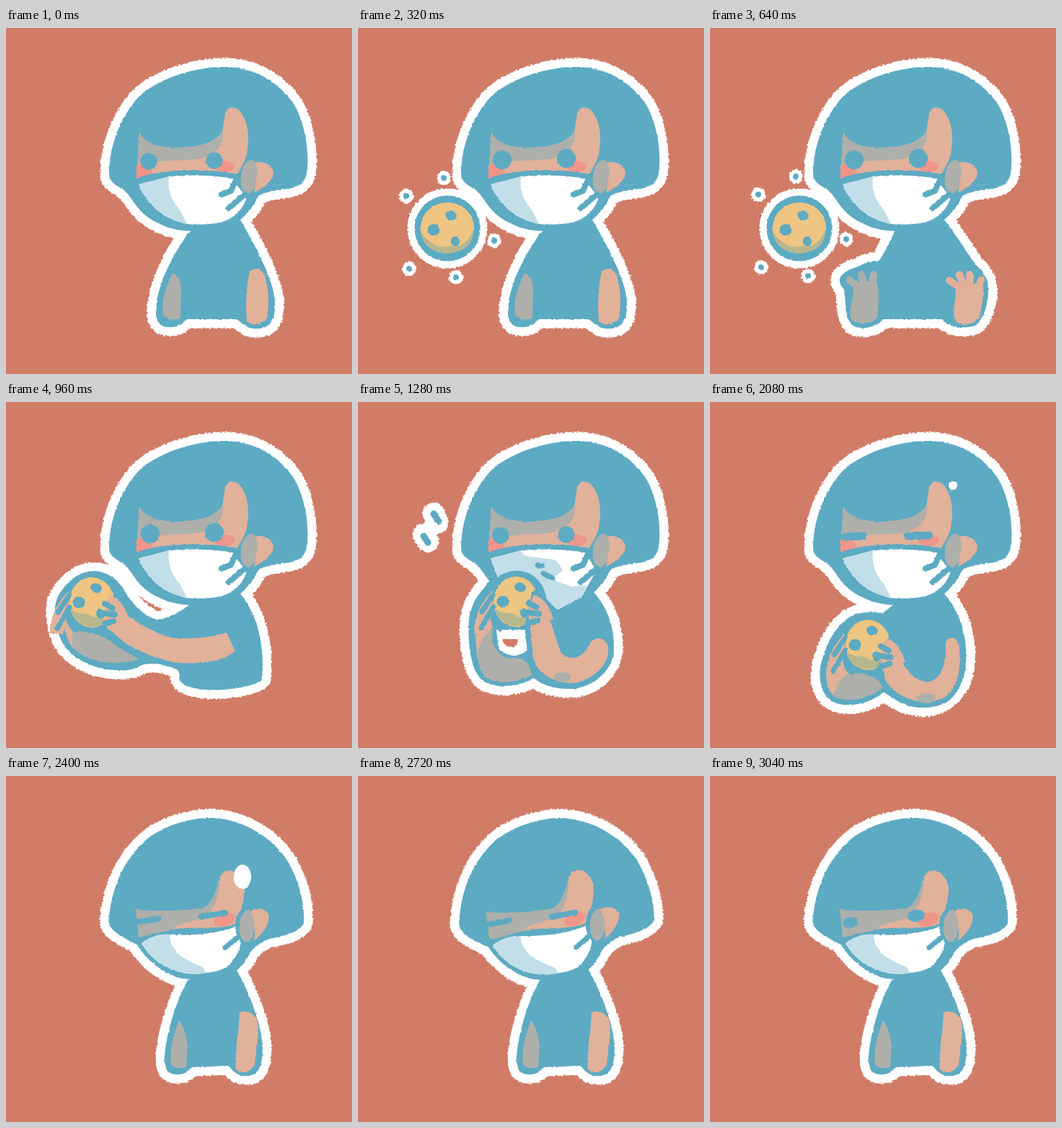
Recreate the animation shown at these times as an HTML page. Size 480 by 480 pixels, loop 3200 ms.

```html
<!DOCTYPE html>
<html lang="en">
<head>
<meta charset="utf-8">
<title>Snack under the mask</title>
<style>
  html, body { margin: 0; width: 100%; height: 100%; overflow: hidden; background: #d17c67; }
  svg { display: block; width: 100vw; height: 100vh; }
  .halo { fill: #fff; stroke: #fff; stroke-width: 25; stroke-linejoin: round; filter: url(#jagged); }
  .art { filter: url(#chalk); }
  .line { fill: none; stroke-linecap: round; stroke-linejoin: round; }
</style>
</head>
<body>
<svg viewBox="0 0 480 480">
  <defs>
    <filter id="jagged" filterUnits="userSpaceOnUse" x="0" y="0" width="480" height="480" color-interpolation-filters="sRGB">
      <feTurbulence type="fractalNoise" baseFrequency=".33" seed="4"/>
      <feDisplacementMap in="SourceGraphic" scale="5" xChannelSelector="R" yChannelSelector="G"/>
    </filter>
    <filter id="chalk" filterUnits="userSpaceOnUse" x="0" y="0" width="480" height="480" color-interpolation-filters="sRGB">
      <feTurbulence type="fractalNoise" baseFrequency=".28" seed="9"/>
      <feDisplacementMap in="SourceGraphic" scale="3" xChannelSelector="R" yChannelSelector="G"/>
    </filter>
  </defs>
  <g id="stage"></g>
</svg>
<script>
const BLUE = '#5daac3', SKIN = '#e1b19a', GREY = '#aeafaa', BLUSH = '#f0958a',
      PALE = '#c1dee9', WHITE = '#fff', GOLD = '#eec582', OLIVE = '#b6b78d', RED = '#d17c67';
const FRAME_MS = 160;

const fill = (d, color) => `<path d="${d}" fill="${color}"/>`;
const line = (d, color, width) => `<path class="line" d="${d}" stroke="${color}" stroke-width="${width}"/>`;
const outlined = (d, color) => line(d, BLUE, 15) + fill(d, color);
const oval = (x, y, rx, ry, color, turn = 0) =>
  `<ellipse cx="${x}" cy="${y}" rx="${rx}" ry="${ry}" fill="${color}" transform="rotate(${turn} ${x} ${y})"/>`;
const move = (x, y, art, scale = 1) => `<g transform="translate(${x} ${y}) scale(${scale})">${art}</g>`;
const wrap = (transform, art) => transform ? `<g transform="${transform}">${art}</g>` : art;

const maskShut =
  fill('M184 217L226 206C260 203 290 204 316 209C320 222 333 230 333 238C328 252 315 266 296 270C280 273 265 273 252 272C220 266 196 246 184 217Z', WHITE) +
  fill('M184 217L226 206C224 222 228 235 236 246C244 255 246 264 252 272C220 266 196 246 184 217Z', PALE);
const maskOpen =
  fill('M184 217L226 206C260 203 290 204 316 209C322 222 332 230 326 242L310 271L277 288L250 262L195 246Z', WHITE) +
  fill('M184 217L226 206L230 213L274 219L284 233L270 246L296 256L318 254L310 271L277 288L250 262L195 246Z', PALE) +
  line('M249 227H256M257 238L270 244', BLUE, 7);

const front = {
  shape: 'M143 200C144 165 156 130 180 100C205 72 258 54 303 54C346 54 381 76 402 110C417 140 421 178 417 202C414 217 403 222 384 224C370 226 358 228 350 233C345 245 335 258 325 266C300 282 265 285 234 279C202 271 186 256 174 237C168 228 162 223 154 219C145 213 143 208 143 200Z',
  face: mask =>
    fill('M185 145C192 160 215 167 240 166C270 165 295 158 301 140C303 125 304 110 313 110C328 110 337 135 336 155C336 177 329 192 320 203L250 198L181 208Z', SKIN) +
    fill('M185 145C192 160 215 167 240 166C270 165 295 158 301 140C303 165 290 178 265 182C235 184 205 185 182 189Z', GREY) +
    fill('M181 190C195 187 204 194 203 203L181 208Z', BLUSH) + oval(303, 192, 14, 8, BLUSH) +
    mask + line('M181 212C215 199 280 197 324 207', BLUE, 7) +
    line('M299 231L312 226L319 211M309 250L324 237L334 229', BLUE, 8) +
    oval(338, 206, 12, 23, GREY, 8) +
    fill('M347 186C360 184 372 192 371 203C368 214 358 222 344 228C348 212 350 200 347 186Z', SKIN),
  eyes: {
    open: oval(198, 185, 11.5, 11.5, BLUE) + oval(289, 184, 11.5, 11.5, BLUE),
    wide: oval(200, 183, 13, 13, BLUE) + oval(289, 181, 13, 13, BLUE),
    shut: line('M187 187L212 186M274 186L304 185', BLUE, 11)
  }
};

const tilted = {
  shape: 'M143 195C148 150 165 115 195 88C220 68 255 58 285 58C330 60 370 85 392 120C408 150 415 180 413 205C405 218 385 222 365 226C350 232 340 240 335 252C328 262 322 270 315 272C290 282 262 284 240 280C215 272 195 255 182 234C170 228 158 222 150 215C142 208 142 200 143 195Z',
  face: () =>
    fill('M180 184C205 190 245 186 270 184C290 178 292 150 300 135C310 125 328 135 331 155C330 175 326 190 318 205C300 214 260 208 232 213L184 224Z', GREY) +
    fill('M232 212C240 203 260 202 275 196C293 184 296 160 297 140C308 123 328 133 331 155C330 175 326 190 318 205C300 214 260 208 232 212Z', SKIN) +
    oval(303, 199, 15, 9, BLUSH, -20) +
    fill('M188 232C200 222 215 219 227 220C260 222 300 218 320 208C332 225 325 245 310 262C300 270 288 272 278 273C240 280 205 262 188 232Z', WHITE) +
    fill('M188 232C200 222 215 219 227 220C228 245 250 255 265 262C272 264 276 268 278 273C240 280 205 262 188 232Z', PALE) +
    line('M304 238L320 225', BLUE, 7) + oval(335, 208, 17, 26, BLUE) + oval(335, 208, 11, 22, GREY, 6) +
    fill('M339 187C350 181 363 184 365 195C364 208 355 220 344 228C347 213 345 200 339 187Z', SKIN),
  eyes: {
    open: oval(195, 203, 11, 7.5, BLUE, -10) + oval(286, 194, 12, 8.5, BLUE, -8),
    shut: line('M184 202L212 198M271 195L304 190', BLUE, 8)
  }
};

const chips = oval(5, -18, 8, 6.5, BLUE, 20) + oval(-19, 2, 8.5, 8, BLUE) + oval(11, 18, 6, 7, BLUE, -20);
const cookie = oval(0, 0, 45.5, 45.5, BLUE) + oval(0, -1, 37, 35, GOLD) +
  fill('M-37 4C-28 20 -10 30 6 24C20 28 32 14 36 2C38 44 -34 46 -37 4Z', OLIVE) + chips;
const heldCookie = oval(0, 0, 41, 41, BLUE) + oval(-1, 2, 31, 35, GOLD) +
  fill('M-31 10C-20 22 -8 14 0 22C8 26 16 20 19 30C4 40 -24 38 -31 10Z', OLIVE) + chips;
const leftFingers =
  fill('M-35 -12C-50 5 -58 20 -59 45L-40 46C-38 30 -30 10 -33 -12Z', SKIN) +
  line('M-33 -7L-48 16M-32 9L-49 38M-32 25Q-31 35 -23 40', BLUE, 7);
const rightFingers =
  fill('M24 -7C35 -6 46 8 51 26L22 40C15 34 14 8 24 -7Z', SKIN) +
  line('M17 4L28 10M14 17L31 19M17 32L29 28', BLUE, 8);

const bodies = {
  rest: {
    shape: 'M258 278C240 300 210 350 208 390C207 410 215 416 230 415C245 414 246 405 252 404L318 404C326 405 328 416 345 417C368 418 374 405 373 380C372 350 345 300 325 266Z',
    art: fill('M232 340C240 345 243 352 243 365L242 403C232 406 222 404 218 398C215 380 222 355 232 340Z', GREY) +
      fill('M338 337C350 331 356 334 360 348C366 370 364 390 362 402C354 413 340 414 334 406C332 385 333 360 338 337Z', SKIN)
  },
  hands: {
    shape: 'M258 278C250 295 242 312 234 324C226 322 214 326 206 331C194 334 182 340 180 348C179 354 183 360 186 362C189 380 186 400 197 412C208 420 232 416 240 404L322 404C330 415 350 418 368 413C381 402 386 382 386 362C386 348 380 338 368 328C356 310 340 285 325 266Z',
    art: fill('M198 354C202 375 190 390 196 404C206 413 226 412 232 400C235 380 234 362 231 350Z', GREY) +
      line('M204 358L194 350M213 354L210 342M225 354L227 342', GREY, 10) +
      fill('M340 354C344 375 333 395 342 408C352 414 368 412 374 400C378 385 380 370 379 354Z', SKIN) +
      line('M342 357L332 350M351 355L346 342M361 355L360 342M374 356L376 349', SKIN, 10)
  },
  reach: {
    shape: 'M325 266C345 290 360 330 355 385C340 398 290 402 268 398C250 395 238 392 240 374C225 362 200 360 186 366C180 370 174 371 168 372C130 374 100 362 82 340C68 320 64 285 72 270C85 245 110 232 128 235C145 238 160 250 168 268C180 285 195 300 212 302C230 298 245 290 258 278Z',
    art: fill('M82 306L92 318C120 318 140 325 152 338L185 357C150 368 110 360 92 340Z', GREY) +
      fill('M82 302L92 318L92 340C84 330 80 315 82 302Z', SKIN),
    arm: outlined('M158 288C175 300 205 325 240 328C270 328 290 325 306 320L318 346C300 360 270 364 240 362C210 358 170 340 158 328C150 320 143 318 142 312C144 305 152 297 158 288Z', SKIN),
    grip: [120, 276]
  },
  eat: {
    shape: 'M325 262C348 285 358 320 354 350C348 380 320 397 295 398C270 398 255 392 244 383C225 395 195 398 175 388C155 375 152 330 154 300C158 280 165 268 175 258C185 240 205 235 220 236L270 255Z',
    art: fill('M164 312L180 290L187 312C184 335 190 350 210 356C235 352 236 365 242 378C220 390 195 393 176 381C166 370 162 340 164 312Z', GREY) +
      fill('M164 312L180 290L186 312C180 320 172 328 166 345C163 338 163 325 164 312Z', SKIN) +
      fill('M192 316L236 316L235 344C222 356 204 352 195 342Z', WHITE) +
      fill('M200 329L222 329L220 338C213 341 206 340 202 335Z', RED),
    arm: outlined('M248 268C262 282 272 320 280 345C288 360 310 360 322 335C325 325 345 325 347 340C350 360 330 385 300 390C270 390 242 375 242 345C241 325 236 310 242 300Z', SKIN) +
      oval(283, 382, 12, 7, GREY),
    grip: [220, 275]
  },
  lower: {
    shape: 'M325 266C345 290 358 320 355 365C352 400 325 425 295 424C270 424 255 412 241 402C225 418 195 424 175 418C150 408 148 375 158 350C165 330 172 318 185 305C200 290 225 290 240 293L258 278Z',
    art: fill('M163 372L180 350L194 376C215 376 230 378 240 396C222 412 195 417 174 410C162 400 160 385 163 372Z', GREY) +
      fill('M163 372L180 348L192 376C180 384 175 394 172 407C162 400 160 385 163 372Z', SKIN),
    arm: outlined('M253 332C265 358 275 386 300 388C320 388 328 365 327 335C328 325 342 325 345 335C350 365 345 395 325 410C300 422 270 415 250 395C240 385 240 375 243 360Z', SKIN) +
      oval(300, 411, 13, 7, GREY),
    grip: [220, 335]
  },
  slim: {
    shape: 'M255 280C240 300 222 355 220 390C220 412 228 415 240 414C255 413 252 404 262 404L308 402C315 408 318 416 335 416C354 416 356 395 356 375C354 340 335 295 318 266Z',
    art: fill('M240 339C247 348 252 365 252 380L250 403C242 407 232 405 228 399C228 378 232 358 240 339Z', GREY) +
      fill('M324 328C332 325 342 328 348 336C352 350 348 380 345 400C338 413 325 414 319 406C317 385 323 355 324 328Z', SKIN)
  }
};

const sparkles = [[67, 231], [119, 206], [189, 293], [136, 344], [71, 332]];
const snack = (scale, glint) => ({
  halo: move(124, 278, '<circle r="43"/>', scale) +
    (glint == null ? '' : sparkles.map(([x, y]) => `<circle cx="${x}" cy="${y + glint}" r="10" stroke="none"/>`).join('')),
  art: move(124, 278, cookie, scale) +
    (glint == null ? '' : sparkles.map(([x, y]) => oval(x, y + glint, 4, 4, BLUE)).join(''))
});
const munch = (x, y) => ({
  halo: move(x, y, '<path class="line" d="M105 155L110 167M91 184L97 193" stroke-width="31"/>'),
  art: move(x, y, line('M105 155L112 166M91 186L97 195', BLUE, 9))
});
const drop = (x, y, rx, ry) => oval(x, y, rx, ry, WHITE);

function compose({ head = front, eyes = 'open', body = 'rest', mask = maskShut, pose, nod, chew = 0, extra, sweat = '' }) {
  const { shape, art, arm = '', grip } = bodies[body];
  const bodyShape = wrap(pose, `<path d="${shape}"/>`);
  const headShape = wrap(nod, `<path d="${head.shape}"/>`);
  const hold = item => grip ? move(grip[0], grip[1] + chew, item) : '';
  return `<g class="halo">${bodyShape}${headShape}${extra ? extra.halo : ''}</g>
    <g class="art"><g fill="${BLUE}">${bodyShape}${headShape}</g>
    ${wrap(nod, head.face(mask) + head.eyes[eyes] + sweat)}
    ${wrap(pose, art + hold(heldCookie + leftFingers) + arm + hold(rightFingers))}${extra ? extra.art : ''}</g>`;
}

const nod = 'rotate(-2 285 270)';
const eating = { body: 'eat', mask: maskOpen };
const frames = [
  {},
  { extra: snack(.9) },
  { extra: snack(1, 2), eyes: 'wide' },
  { body: 'hands', extra: snack(1, -2), eyes: 'wide' },
  { body: 'hands', extra: snack(1, 0), eyes: 'wide' },
  { body: 'reach', pose: 'translate(7 12)', eyes: 'wide' },
  { body: 'reach', eyes: 'wide' },
  { body: 'eat', pose: 'translate(-3 5)' },
  { ...eating, extra: munch(0, 0) },
  { ...eating, chew: 4, extra: munch(-9, 4) },
  { ...eating, extra: munch(0, 0) },
  { ...eating, chew: 4, extra: munch(0, 4) },
  { ...eating, extra: munch(-9, 0), eyes: 'shut' },
  { body: 'lower', eyes: 'shut', sweat: drop(337, 116, 6, 6) },
  { pose: 'translate(290 280) scale(1.1 1.08) translate(-290 -280)', eyes: 'shut', sweat: drop(335, 123, 8, 10) },
  { head: tilted, body: 'slim', eyes: 'shut', sweat: drop(328, 140, 12, 17) },
  { head: tilted, body: 'slim', eyes: 'shut', nod, sweat: drop(328, 150, 12, 17) },
  { head: tilted, body: 'slim', eyes: 'shut', nod },
  { head: tilted, body: 'slim', eyes: 'open', nod },
  { head: tilted, body: 'slim' }
].map(compose);

const stage = document.getElementById('stage');
let shown = -1;
function tick() {
  const index = Math.floor(performance.now() / FRAME_MS) % frames.length;
  if (index !== shown) stage.innerHTML = frames[shown = index];
  requestAnimationFrame(tick);
}
tick();
</script>
</body>
</html>
```
